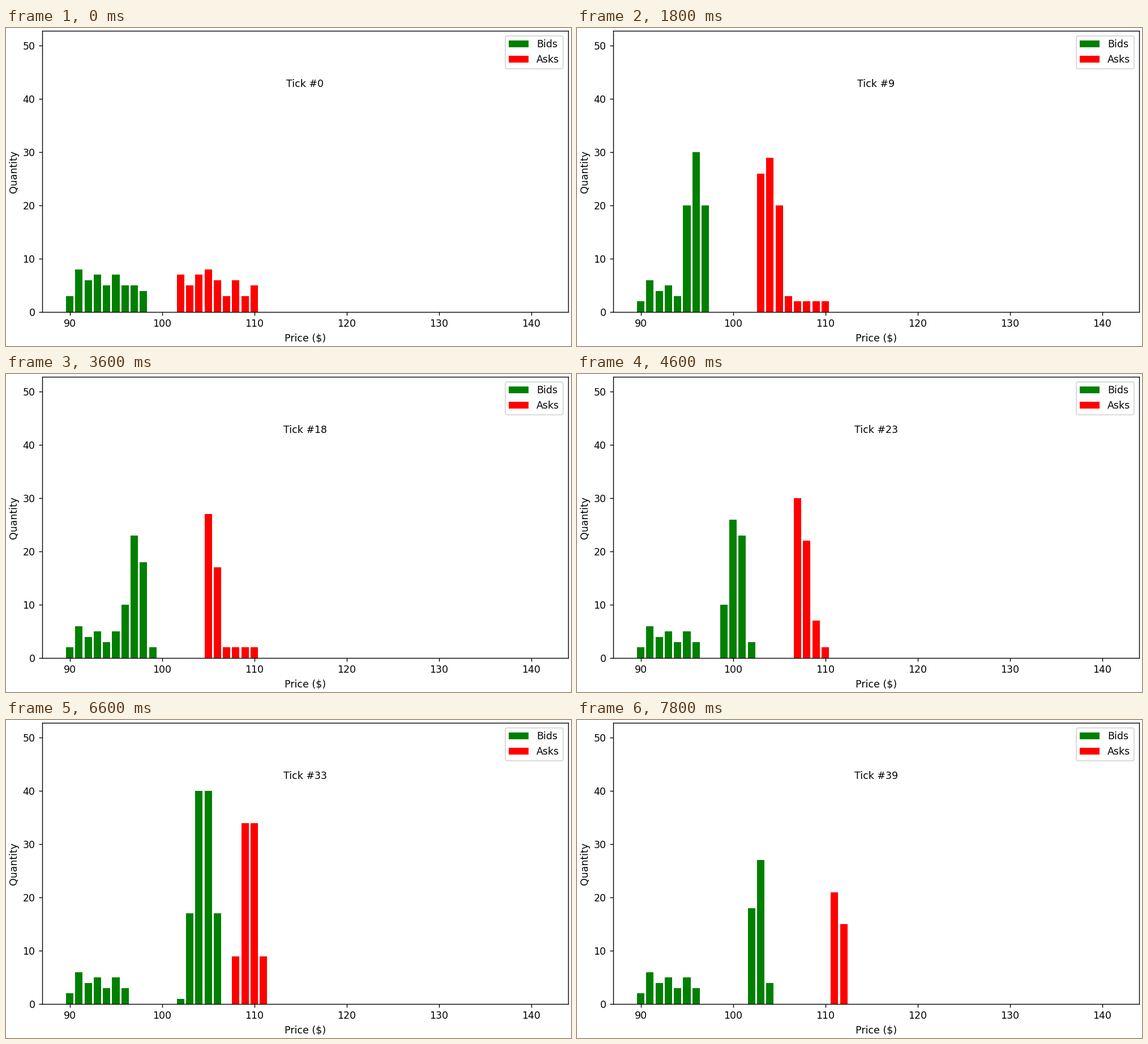
These frames come from a looping animation (998 px wide and 561 px high, 8000 ms). A matplotlib script:

```python
import numpy as np
import matplotlib.pyplot as plt
from matplotlib.animation import FuncAnimation

W, H, DPI = 998, 561, 124.75
TICKS, STEP_MS = 40, 200
PRICES = np.arange(90, 114)

# Opening orders, cheapest first, from 90 (bids) and 102 (asks)
OPEN_BIDS = np.pad([3, 8, 6, 7, 5, 7, 5, 5, 4], (0, 15))
OPEN_ASKS = np.pad([7, 5, 7, 8, 6, 3, 6, 3, 5], (12, 3))
REST_BIDS = np.where(PRICES < 97, 0.69 * OPEN_BIDS, 0)
REST_ASKS = np.minimum(OPEN_ASKS, 2)
THIN_TICKS = 6

# Each side's wall of fresh orders follows the market: best price, centre, height, width
KEY_TICKS = [0, 9, 18, 23, 29, 33, 39]
BID_KEYS = np.array([
    (98, 96.0, 0, 1.35), (97, 96.0, 30, 1.35), (101, 97.2, 23, 1.3),
    (104, 100.3, 26.5, 1.3), (105, 103.1, 25.5, 2.4), (106, 104.5, 41, 1.55),
    (106, 102.75, 27, 1.0)])
ASK_KEYS = np.array([
    (102, 103.8, 0, 1.7), (103, 103.8, 29, 1.7), (105, 105.0, 27, 1.3),
    (107, 106.5, 30, 2.2), (109, 108.0, 39, 2.4), (108, 109.5, 35.5, 1.35),
    (111, 111.3, 21.5, 1.0)])


def side(tick, keys, opening, rest, sign):
    """Quantity per price; sign is +1 for bids (below best), -1 for asks (above)."""
    best, centre, height, width = (np.interp(tick, KEY_TICKS, k) for k in keys.T)
    wall = height * np.exp(-(np.abs(PRICES - centre) / width) ** 3)
    resting = opening + (rest - opening) * min(tick / THIN_TICKS, 1)
    visible = sign * (np.rint(best) - PRICES) >= 0
    return np.rint(np.maximum(wall, resting)) * visible


plt.rcParams["font.family"] = "DejaVu Sans"
fig = plt.figure(figsize=(8, 4.497), dpi=DPI, facecolor="white")
left, right, top, bottom = 63.6, 992.8, 4.9, 501.3
ax = fig.add_axes([left / W, 1 - bottom / H, (right - left) / W, (bottom - top) / H])

bids = ax.bar(PRICES, 0 * PRICES, color="green", label="Bids")
asks = ax.bar(PRICES, 0 * PRICES, color="red", label="Asks")
label = ax.text(0.5, 0.8, "", transform=ax.transAxes, ha="center")
ax.set(xlim=(87, 144), ylim=(0, 52.8), xlabel="Price ($)", ylabel="Quantity")
ax.legend(loc="upper right")


def set_heights(bars, heights):
    for bar, height in zip(bars, heights):
        bar.set_height(height)


def update(tick):
    set_heights(bids, side(tick, BID_KEYS, OPEN_BIDS, REST_BIDS, 1))
    set_heights(asks, side(tick, ASK_KEYS, OPEN_ASKS, REST_ASKS, -1))
    label.set_text(f"Tick #{tick}")
    return [*bids, *asks, label]


anim = FuncAnimation(fig, update, frames=TICKS, interval=STEP_MS,
                     init_func=lambda: update(0), repeat=True, repeat_delay=0)
plt.show()
```
